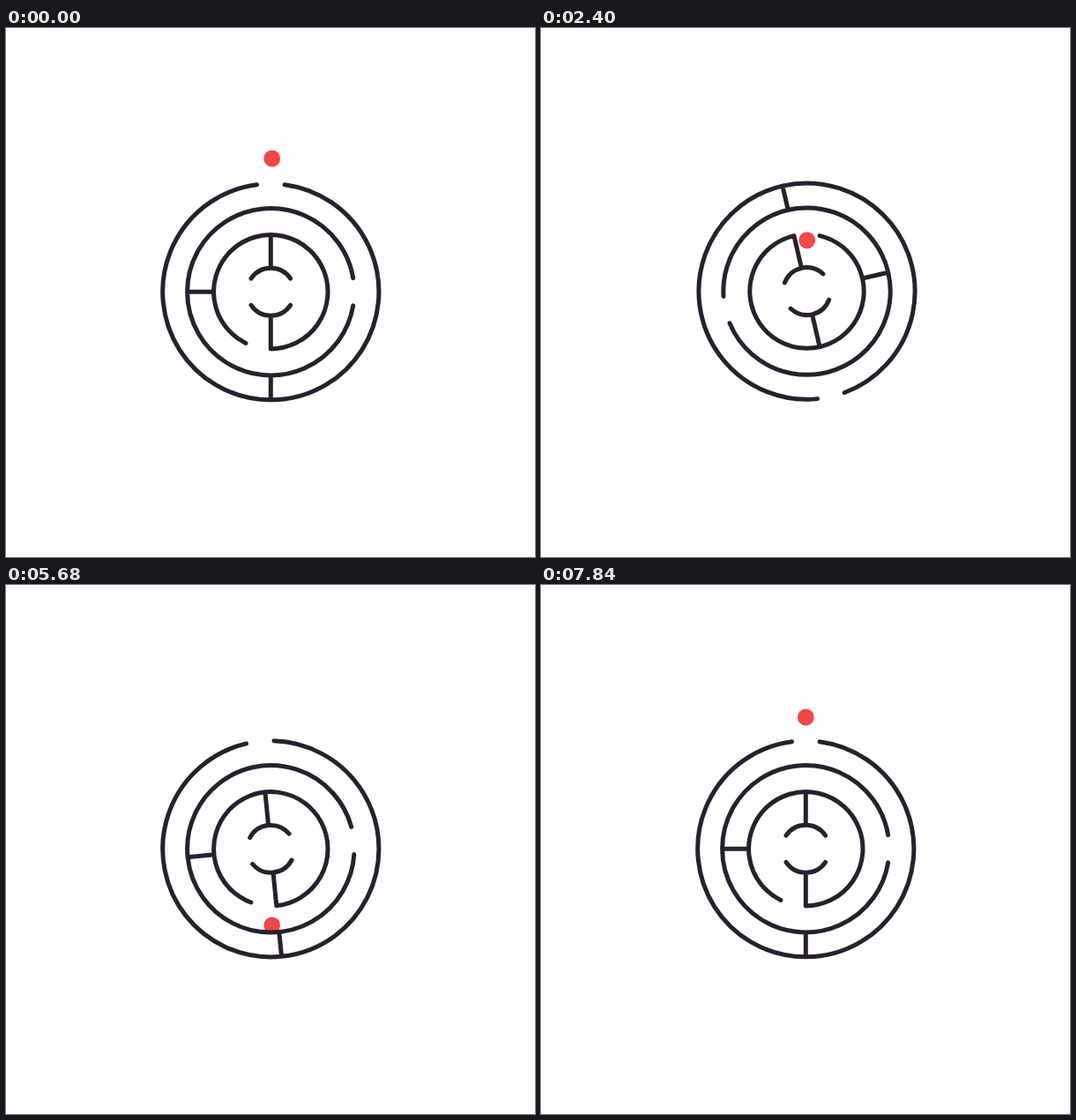
These frames come from a looping animation (600 by 600 pixels, 8160 ms). An HTML page:

```html
<!DOCTYPE html>
<html lang="en">
<head>
<meta charset="utf-8">
<title>Circular maze</title>
<style>
  html, body { margin: 0; width: 100%; height: 100%; overflow: hidden; background: #fefefe; }
  svg { display: block; width: 100vw; height: 100vh; }
</style>
</head>
<body>
<svg viewBox="0 0 600 600">
  <circle id="ball" r="9.4" fill="#f04848"/>
  <path id="maze" fill="none" stroke="#27212e" stroke-width="5" stroke-linecap="round" stroke-linejoin="round"/>
</svg>
<script>
const FRAME = 40, LOOP = 8160;
const CENTER_X = 300.95, CENTER_Y = 299;
const OUTER = 122.6, MIDDLE = 94.7, INNER = 64.7, CORE = 26.9;
const ball = document.getElementById('ball');
const maze = document.getElementById('maze');

// Angles are clockwise degrees from twelve o'clock.
const gap = { outer: 0, middle: 90, inner: 193, core: 270 };

const point = (r, deg) => {
  const a = deg * Math.PI / 180;
  return `${(r * Math.sin(a)).toFixed(3)} ${(-r * Math.cos(a)).toFixed(3)}`;
};
const spoke = (r1, r2, deg) => `M${point(r1, deg)}L${point(r2, deg)}`;
const ring = (r, middle, half) =>
  `M${point(r, middle + half)}A${r} ${r} 0 1 1 ${point(r, middle - half)}`;
const coreArc = middle =>
  `M${point(CORE, middle - 56)}A${CORE} ${CORE} 0 0 1 ${point(CORE, middle + 56)}`;

maze.setAttribute('d', [
  ring(OUTER, gap.outer, 7.4),
  ring(MIDDLE, gap.middle, 9.5),
  ring(INNER, gap.inner, 13),
  coreArc(0),
  coreArc(180),
  spoke(MIDDLE, OUTER, 180),
  spoke(INNER, MIDDLE, 270),
  spoke(CORE, INNER, 0),
  spoke(CORE, INNER, 180)
].join(''));

const fall = u => u * u;
const smooth = u => u * u * (3 - 2 * u);
const smoother = u => u * u * u * (u * (6 * u - 15) + 10);
const progress = (t, start, end) => Math.min(1, Math.max(0, (t - start) / (end - start)));

// Where a gap must turn to, and where the ball comes to rest.
const toTop = deg => deg > 180 ? 360 - deg : -deg;
const toBottom = deg => 180 - deg;
const onTopOf = r => CENTER_Y - r - 6.5;
const inside = r => CENTER_Y + r - 7.7;

// The maze turns and the ball drops in alternation; clock counts frames.
const DROP_TIME = 7, OVERLAP = 1.15;
const turns = [], drops = [];
let clock = 0;

function drop(target) {
  drops.push({ start: clock, end: clock + DROP_TIME, target });
  clock += DROP_TIME;
}

function turnAndDrop(target, duration, landing) {
  turns.push({ start: clock, end: clock + duration, target });
  clock += duration - OVERLAP;
  drop(landing);
}

drop(onTopOf(MIDDLE));
turnAndDrop(toTop(gap.middle), 9.7, onTopOf(INNER));
turnAndDrop(toTop(gap.inner), 34.5, onTopOf(CORE));
turnAndDrop(toTop(gap.core), 15, 298);
clock = 88;
turnAndDrop(toBottom(gap.core), 24, inside(INNER));
turnAndDrop(toBottom(gap.inner), 15, inside(MIDDLE));
turnAndDrop(toBottom(gap.middle), 20.3, inside(OUTER));
turnAndDrop(toBottom(gap.outer), 9.7, 449.5);
const rollStart = clock, rollEnd = 195;
turns.push({ start: clock, end: 196, target: 360 });

const follow = (moves, value, t, ease) => moves.reduce(
  (v, m) => v + (m.target - v) * ease(progress(t, m.start, m.end)), value);

function draw(ms) {
  const t = Math.floor(ms % LOOP / FRAME);
  const angle = follow(turns, 0, t, smooth);
  maze.setAttribute('transform',
    `translate(${CENTER_X} ${CENTER_Y}) rotate(${angle}) translate(-.65 .25)`);

  let x = 301.7, y = follow(drops, 148, t, fall);
  if (t > rollStart) {
    // Roll around the outside, from the bottom to the top.
    const a = Math.PI * smoother(progress(t, rollStart, rollEnd));
    x = 301 + 0.7 * Math.cos(a) + 147.8 * Math.sin(a);
    y = 299.75 + 149.75 * Math.cos(a);
  }
  ball.setAttribute('cx', x);
  ball.setAttribute('cy', y);
}

const began = performance.now();
function tick() {
  draw(performance.now() - began);
  requestAnimationFrame(tick);
}
draw(0);
requestAnimationFrame(tick);
</script>
</body>
</html>
```
